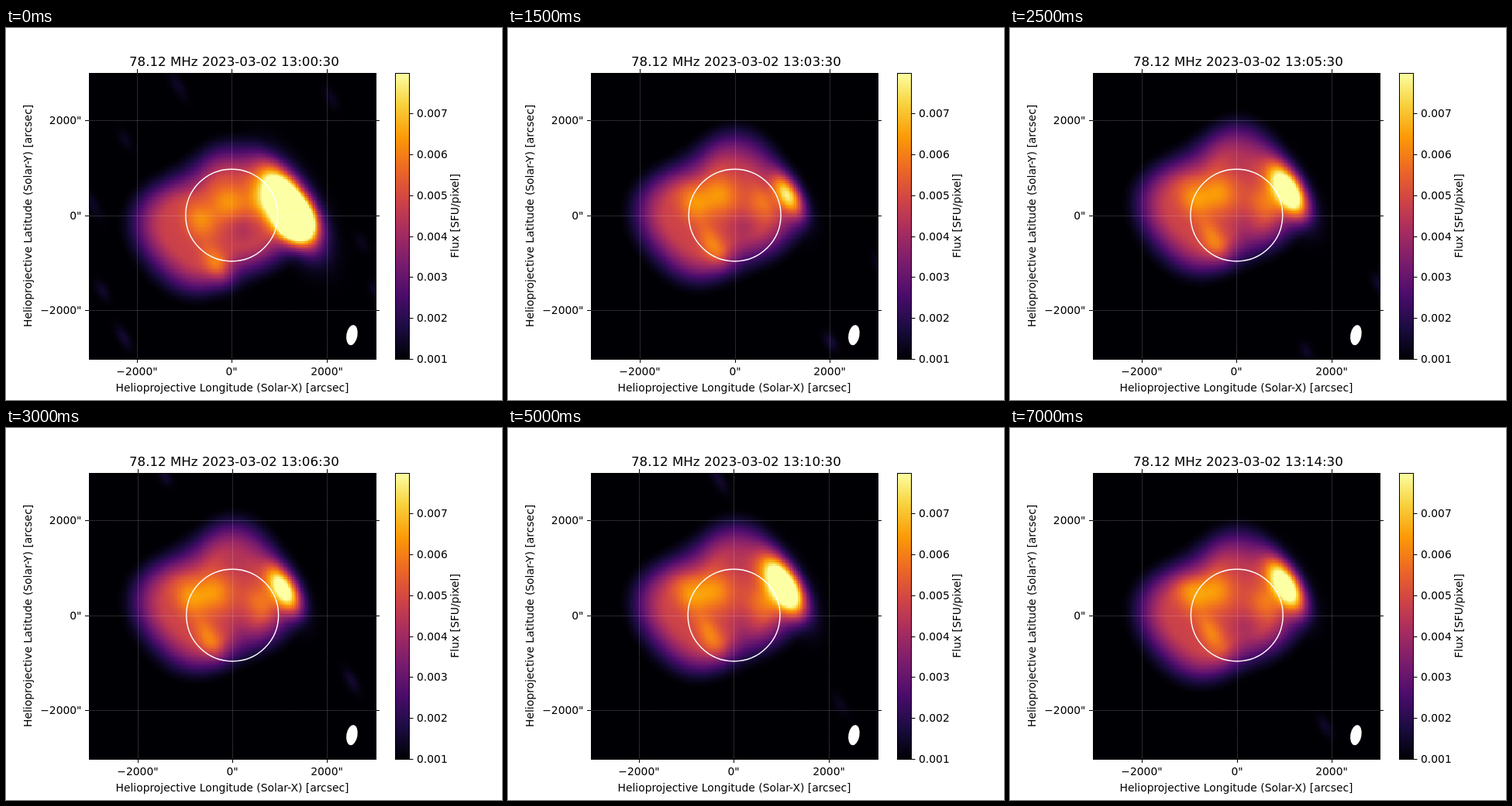
Write an HTML page with a canvas that moves like this. It is 640 by 480 pixels and loops after 7500 ms.

```html
<!DOCTYPE html>
<html lang="en">
<head>
<meta charset="utf-8">
<title>Solar radio flux</title>
<style>
html, body { margin: 0; width: 100%; height: 100%; overflow: hidden; background: #fff; }
canvas { display: block; }
</style>
</head>
<body>
<canvas id="stage" width="640" height="480"></canvas>
<script>
const ctx = document.getElementById('stage').getContext('2d');
const STEP = 500, COUNT = 15;
const LEFT = 107, RIGHT = 477, TOP = 58, BOTTOM = 427.2;
const SPAN = 369.6, MID_X = 292, MID_Y = 242.4, TICK = 122.4;
const GRID = 151, CELL = SPAN / GRID;
const TILT = Math.PI / 3, COS = Math.cos(TILT), SIN = Math.sin(TILT);
const FACE = '"DejaVu Sans", Verdana, sans-serif';

// inferno colour ramp
const RAMP = ['000004', '1b0c41', '4a0c6b', '781c6d', 'a52c60', 'cf4446', 'ed6925', 'fb9b06', 'f7d13d', 'fcffa4']
  .map(h => [0, 2, 4].map(k => parseInt(h.slice(k, k + 2), 16)));

const clamp = v => Math.min(1, Math.max(0, v));
const smooth = v => { const s = clamp(v); return s * s * (3 - 2 * s); };
const fade = (n, tau) => Math.exp(-n / tau);

function rampColor(v) {
  const p = v * (RAMP.length - 1);
  const k = Math.min(RAMP.length - 2, Math.floor(p));
  return RAMP[k].map((a, n) => a + (RAMP[k + 1][n] - a) * (p - k));
}
const LUT = Array.from({ length: 256 }, (_, k) => rampColor(k / 255));

function seeded(seed) {
  return () => {
    seed = (seed * 16807) % 2147483647;
    return seed / 2147483647;
  };
}

// Corona outline: a circle with a few harmonics
const radius = a => 107 + 19 * Math.cos(a - 2.39) + 10 * Math.cos(2 * a - 0.72)
  + 4 * Math.cos(3 * a + 1.97) + 5.5 * Math.cos(4 * a + 0.75) + 2.5 * Math.sin(5 * a);

// Flare strength as [frame, strength], linear in between
const FLARE = [[0, 1.8], [3, 0.7], [5, 1.1], [8, 0.36], [10, 1.25], [12, 0.75], [14, 1.05]];

function flareAt(n) {
  const k = Math.max(1, FLARE.findIndex(p => p[0] >= n));
  const [n0, s0] = FLARE[k - 1], [n1, s1] = FLARE[k];
  return s0 + (s1 - s0) * (n - n0) / (n1 - n0);
}

// A soft spot: centre, size along and across the tilt, strength
const spot = (x, y, len, wid, amp) => ({ x, y, len, wid, amp });

function spotsAt(n) {
  const flare = flareAt(n), e = fade(n, 3);
  const spots = [
    spot(355 + 11 * fade(n, 6), 202 + 28 * fade(n, 4), 12 + 13 * flare, 6.5 + 5.2 * flare, flare),
    spot(374, 250, 17, 15, fade(n, 1)),
    spot(234 + 17 * e, 214 + 34 * e, 17, 14, 0.2),
    spot(265 + 22 * e, 210 + 15 * e, 18, 17, 0.22),
    spot(260 + 12 * e, 266 + 40 * e, 20, 10, 0.19),
    spot(328, 226, 16, 13, 0.15),
    spot(303, 258, 14, 12, -0.08),
    spot(300, 164, 18, 16, -0.06)
  ];
  // faint streaks in the sky
  const rnd = seeded(4001 + n * 977);
  const streaks = 2 + Math.round(7 * fade(n, 1));
  for (let k = 0; k < streaks; k++) {
    const a = rnd() * 2 * Math.PI, d = 160 + 60 * rnd();
    spots.push(spot(285 + d * Math.cos(a), 242 + d * Math.sin(a), 8 + 7 * rnd(), 5, 0.04 + 0.06 * rnd()));
  }
  return spots;
}

const map = document.createElement('canvas');
map.width = map.height = GRID;
const mapCtx = map.getContext('2d');
const pixels = mapCtx.createImageData(GRID, GRID);

function paintMap(n) {
  const spots = spotsAt(n);
  const cx = 285, cy = 240 + 20 * Math.cos(Math.PI * n / 8) * fade(n, 10);
  for (let k = 0; k < GRID * GRID; k++) {
    const x = LEFT + (k % GRID + 0.5) * CELL;
    const y = TOP + (Math.floor(k / GRID) + 0.5) * CELL;
    const depth = radius(Math.atan2(cy - y, x - cx)) - Math.hypot(x - cx, y - cy);
    let v = 0.54 * smooth((depth + 10) / 66);
    for (const s of spots) {
      const dx = x - s.x, dy = y - s.y;
      const u = (dx * COS + dy * SIN) / s.len, w = (dy * COS - dx * SIN) / s.wid;
      v += s.amp * Math.exp(-(u * u + w * w) / 2);
    }
    pixels.data.set(LUT[Math.round(clamp(v) * 255)], k * 4);
    pixels.data[k * 4 + 3] = 255;
  }
  mapCtx.putImageData(pixels, 0, 0);
}

function text(str, x, y, align = 'center', size = 13.89, turn = 0) {
  ctx.save();
  ctx.translate(x, y);
  ctx.rotate(turn);
  ctx.font = size + 'px ' + FACE;
  ctx.textAlign = align;
  ctx.fillStyle = '#000';
  ctx.fillText(str, 0, 0);
  ctx.restore();
}

const upright = (str, x) => text(str, x, MID_Y, 'center', 13.89, -Math.PI / 2);

function line(x1, y1, x2, y2) {
  ctx.beginPath();
  ctx.moveTo(x1, y1);
  ctx.lineTo(x2, y2);
  ctx.stroke();
}

function gridLine(...ends) {
  ctx.save();
  ctx.strokeStyle = 'rgba(255,255,255,.6)';
  ctx.lineWidth = 0.7;
  ctx.setLineDash([0.7, 1.15]);
  line(...ends);
  ctx.restore();
}

function frameBox(x, w) {
  ctx.strokeStyle = '#000';
  ctx.lineWidth = 1;
  ctx.strokeRect(x + 0.5, TOP + 0.5, w, 369);
}

function drawAxes(sunX) {
  frameBox(LEFT, RIGHT - LEFT);
  for (const n of [-1, 0, 1]) {
    const x = Math.round(sunX + n * TICK) + 0.5;
    const y = Math.round(241.6 - n * TICK) + 0.5;
    const label = (n < 0 ? '\u2212' : '') + Math.abs(n * 2000) + '"';
    gridLine(x, BOTTOM, x, TOP);
    gridLine(LEFT, y, RIGHT, y);
    line(x, 427, x, 432);
    line(x, TOP, x, TOP - 5);
    line(LEFT, y, LEFT - 5, y);
    line(RIGHT, y, RIGHT + 5, y);
    text(label, x - 0.5, 448);
    text(label, 97.5, y + 4.5, 'right');
  }
  text('Helioprojective Longitude (Solar-X) [arcsec]', MID_X, 469);
  upright('Helioprojective Latitude (Solar-Y) [arcsec]', 33);
}

function drawBar() {
  const ramp = ctx.createLinearGradient(0, BOTTOM, 0, TOP);
  RAMP.forEach((c, k) => ramp.addColorStop(k / (RAMP.length - 1), `rgb(${c})`));
  ctx.fillStyle = ramp;
  ctx.fillRect(502, TOP, 18.5, 369);
  frameBox(502, 18);
  for (let n = 1; n <= 7; n++) {
    const y = Math.round(BOTTOM - (n - 1) * 52.88) + 0.5;
    line(520.5, y, 525.5, y);
    text('0.00' + n, 530, y + 4.5, 'left');
  }
  upright('Flux [SFU/pixel]', 584);
}

function draw(n) {
  // the pointing drifts and is corrected every twelve minutes
  const sunX = 292.85 - 0.155 * ((n + 11) % 12);
  ctx.fillStyle = '#fff';
  ctx.fillRect(0, 0, 640, 480);

  paintMap(n);
  ctx.imageSmoothingEnabled = false;
  ctx.drawImage(map, LEFT, TOP, RIGHT - LEFT, 369);
  drawAxes(sunX);

  ctx.strokeStyle = '#fff';
  ctx.lineWidth = 1.4;
  ctx.beginPath();
  ctx.arc(sunX + 0.1, 241.6, 59.4, 0, 2 * Math.PI);
  ctx.stroke();

  // beam shape
  ctx.fillStyle = '#fff';
  ctx.beginPath();
  ctx.ellipse(446.4, 396.2, 7.1, 13.2, 0.17, 0, 2 * Math.PI);
  ctx.fill();

  drawBar();
  const minute = String(n).padStart(2, '0');
  text(`78.12 MHz 2023-03-02 13:${minute}:30`, 294.4, 49, 'center', 16.67);
}

let shown = -1;
function tick() {
  const n = Math.floor(performance.now() / STEP) % COUNT;
  if (n !== shown) draw(shown = n);
  requestAnimationFrame(tick);
}
tick();
</script>
</body>
</html>
```
